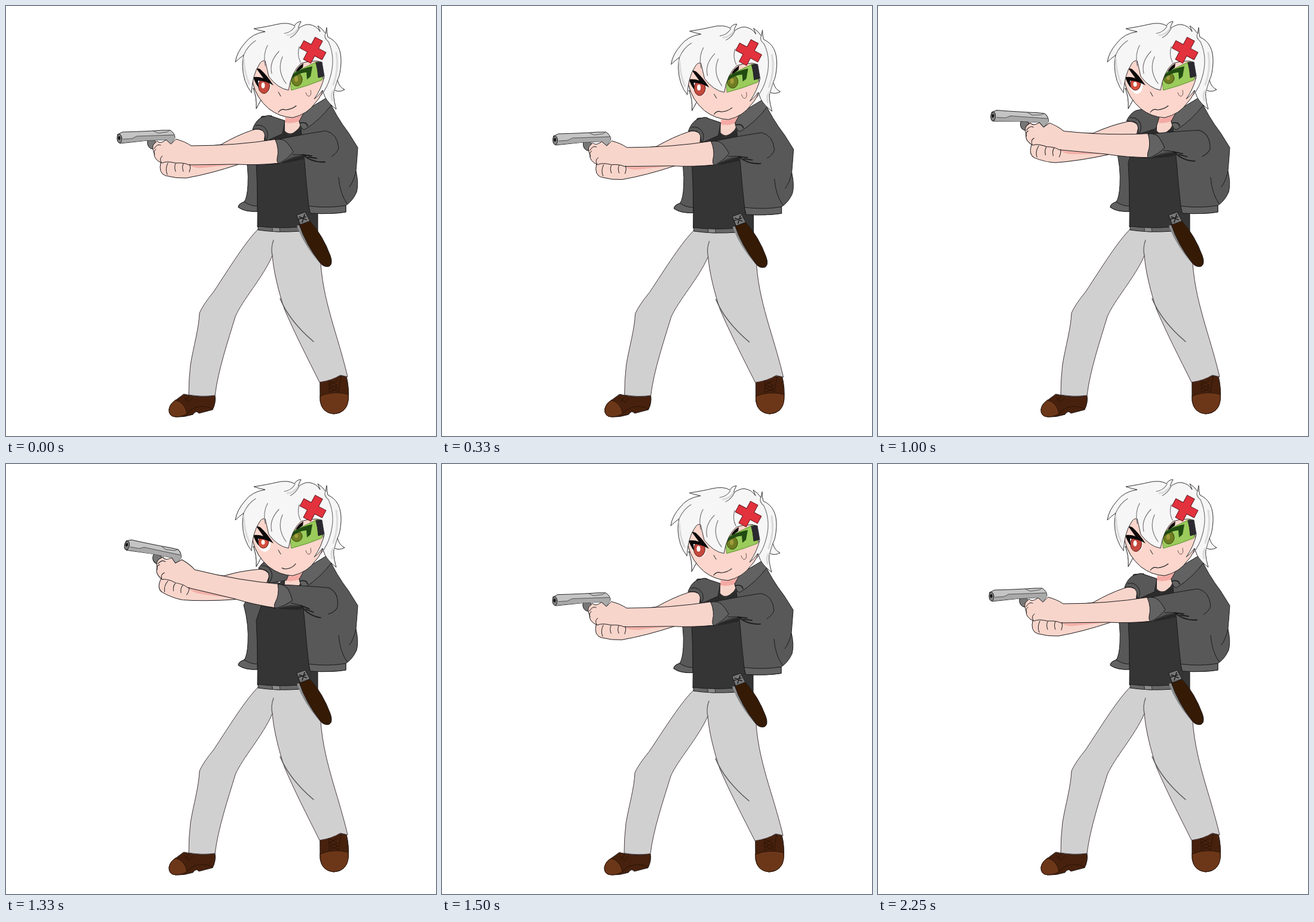
These frames come from a looping animation (720x720 px, 2410 ms). An HTML page with a canvas:

```html
<!DOCTYPE html>
<html lang="en">
<head>
<meta charset="utf-8">
<title>Aiming</title>
<style>
html, body { margin: 0; width: 100%; height: 100%; overflow: hidden; background: #fff; }
canvas { display: block; width: 720px; height: 720px; }
</style>
</head>
<body>
<canvas id="stage" width="720" height="720"></canvas>
<script>
const ctx = document.getElementById('stage').getContext('2d');
const LOOP = 2410, STEP = 1000 / 12;
const INK = '#1d1b1d', SKIN = '#f8d5cb', CLOTH = '#585858', TRIM = '#626262', SHIRT = '#353535', HAIR = '#f6f6f6';

// Arm lift in degrees and crouch amount, keyed by drawing step
const LIFT = { 9: 0.6, 10: 1.6, 11: 3.2, 12: 6, 13: 12, 14: 18, 15: 20.4, 16: 14, 17: 6 };
const DIP = [1, 0.7, 0.4, 0.15];

function shape(d, fill, line = INK, w = 1) {
  const p = new Path2D(d);
  if (fill) { ctx.fillStyle = fill; ctx.fill(p); }
  if (line) { ctx.strokeStyle = line; ctx.lineWidth = w; ctx.stroke(p); }
}
const stroke = (d, color = INK, w = 1) => shape(d, null, color, w);

function oval(x, y, rx, ry, fill, line, rot = 0) {
  ctx.beginPath();
  ctx.ellipse(x, y, rx, ry, rot, 0, 7);
  ctx.fillStyle = fill;
  ctx.fill();
  if (line) { ctx.strokeStyle = line; ctx.lineWidth = 1; ctx.stroke(); }
}

function turned(x, y, deg, draw) {
  ctx.save();
  ctx.translate(x, y);
  ctx.rotate(deg * Math.PI / 180);
  ctx.translate(-x, -y);
  draw();
  ctx.restore();
}

function legs() {
  shape('M298 650Q326 657 350 652Q352 664 346 676L323 682Q318 676 313 684Q298 689 284 688Q272 687 273 675Q275 665 284 660Z', '#47210d');
  shape('M284 660Q299 663 303 682Q296 688 284 688Q272 687 273 675Q275 665 284 660Z', '#6c3719', '#2a1408');
  stroke('M303 682Q320 664 345 674M298 655L306 663M307 653L300 662M313 656L306 664', '#2a1408');
  shape('M526 628Q545 617 570 620Q575 640 573 660Q570 682 549 683Q529 681 526 662Z', '#47210d');
  shape('M526 653Q548 644 573 650Q576 680 549 683Q525 681 526 653Z', '#6c3719', '#2a1408');
  stroke('M541 627L555 635L542 640L556 645M555 627L541 634L556 640L543 646M541 622V647M561 620L557 646', '#2a1408');
  shape('M423 373C402 393 375 437 348 478Q330 500 324 514C323 540 314 570 309 600Q306 625 306 651Q328 655 350 652C355 610 372 560 384 520C396 492 430 455 446 418C448 445 457 480 466 507C482 545 505 590 525 630Q546 627 560 618L572 621C566 595 557 565 548 535C538 500 530 470 527 432L508 374Z', '#d0d0d0', '#493b3f');
  stroke('M448 392Q443 405 446 418', '#555', 1.2);
  stroke('M459 490Q474 527 515 562', '#555', 1.4);
}

function torso() {
  shape('M428 185Q410 215 398 236Q407 270 405 300Q404 320 399 328Q389 331 389 337Q400 345 421 344L421 262L468 215L445 184Z', CLOTH);
  shape('M399 328Q409 335 421 335V344Q400 345 389 337Q389 331 399 328Z', TRIM);
  shape('M467 193L435 215L419 262Q422 320 421 370Q455 374 491 371L522 380V343L508 345L502 190Z', SHIRT);
  shape('M423 369Q455 373 492 370L494 377Q455 380 422 375Z', '#676767');
  shape('M446 371L458 371.5L459 378L447 377.5Z', '#8c8c8c', '#333');
  shape('M467 184L467 209Q476 219 489 206L498 190V170Z', SKIN, null);
  shape('M468 187Q480 190 496 182L491 193Q479 198 467 195Z', '#f4aaa4', null);
  shape('M456 206L467 210L475 218L491 204L497 214L477 238L446 230Z', '#2c2c2c', null);
  shape('M540 156Q552 184 574 213L589 237Q588 253 586 276Q591 298 587 312Q580 327 569 334L569 345Q545 349 510 347L507 335Q503 300 500 262L494 207L510 180Z', CLOTH);
  shape('M507 335Q540 339 569 334V345Q545 349 510 347Z', TRIM);
  stroke('M557 287Q559 314 571 331M586 277Q582 294 575 303');
  shape('M491 193L500 176Q518 165 538 153L547 163Q525 192 500 207Q494 208 491 193Z', TRIM);
  stroke('M492 196Q503 193 505 201', INK, 1.6);
  shape('M487 368L510 361Q531 387 543 418Q548 432 541 436Q532 438 525 430Q499 401 487 368Z', '#8b8b8b', null);
  shape('M491 366L509 360Q531 385 543 418Q548 432 541 436Q532 438 526 430Q502 399 491 366Z', '#351a05');
  shape('M487 350L501 345L509 360L493 366Z', '#777');
  stroke('M491 353L503 358M500 349L496 362M490 357L502 353', INK, 1.6);
}

function gun() {
  shape('M237 225Q235 238 247 240L254 230L249 225Z', '#777');
  shape('M187 215L195 211Q235 210 262 208L275 208Q283 213 283 221L276 231L266 224L238 225L191 230Q185 222 187 215Z', '#c4c4c4', '#2b2526');
  shape('M196 223L211 222L219 218L280 215L283 221L276 231L266 224L238 225L193 229Z', '#a9a9a9', null);
  stroke('M196 223L211 222L219 218L281 216M246 209L255 213L270 211L274 208', '#555');
  oval(190, 222, 4, 7.5, '#808080', INK, -0.05);
  oval(189.5, 221, 2, 3, '#111');
}

function farArm() {
  shape('M259 262Q255 280 267 284Q285 289 302 288Q342 281 390 265L430 245L434 212Q424 203 412 208Q388 216 360 232L300 240Z', SKIN);
  shape('M308 267L382 265L330 271Q314 272 308 267Z', '#f3b0a8', null);
  shape('M413 206Q418 192 427 187L440 183L467 192L463 214L438 225Q434 226 434 220Q433 205 421 206Z', CLOTH);
  stroke('M418 200Q431 197 437 209Q440 218 436 225');
}

function nearArm() {
  // Shade the sleeve casts on the shirt
  shape('M420 262L459 262L499 250L499 256Q470 264 440 266Z', '#272727', null);
  gun();
  shape('M285 223Q300 227 310 234Q385 234 453 223L459 263Q420 267 385 265L306 266Q298 262 284 263Q269 259 261 263Q247 257 248 246Q244 237 247 232L253 226Q258 232 268 224L276 231Z', SKIN);
  stroke('M248 239Q253 230 259 233M249 249Q246 243 251 240M260 262Q256 255 262 251');
  stroke('M271 263Q266 273 270 282M284 264Q281 269 284 277M297 264Q294 270 297 277M308 265Q310 271 307 278');
  // Sleeve with rolled cuff
  shape('M453 224Q490 216 535 209Q558 215 557 240Q551 253 534 258Q514 258 497 250Q481 249 459 264Z', CLOTH, null);
  stroke('M453 224Q490 216 535 209Q555 213 557 238Q554 247 545 252M480 249Q497 248 503 251');
  stroke('M497 249Q513 263 534 261M496 249L512 251M506 253L520 255', INK, 1.8);
  shape('M451 224Q462 221 470 228Q477 236 481 244Q471 257 456 264Q453 261 454 255Q458 240 451 224Z', TRIM);
}

function face(look, smile, twitch) {
  shape('M414 138Q420 152 419 172Q427 158 430 150Z', HAIR);
  shape('M415 95L413 128Q419 154 440 172Q458 186 480 187Q505 181 518 162Q530 150 533 130L525 90L470 70Z', '#fcd6cc');

  // Bare eye
  shape('M416 123Q430 120 443 131Q444 145 434 147Q422 146 416 123Z', '#fff', null);
  oval(432 - look, 134 - 3 * look + twitch, 9.5 - look, 12.5 - 2.5 * look, look > 0.5 ? '#d5503e' : '#c4483d', '#5b1b17');
  oval(430.5, 133 - 2 * look + twitch, 3, 5 - look, '#fff');
  shape('M418 103L426 106Q438 117 448 133Q434 125 422 125L423 137Q417 129 414 119Q424 118 431 121Z', '#0c0a0b', null);

  // Eye behind the lens
  shape('M475 115L521 93L533 97L529 124Q505 134 478 141Z', '#9acb5b', '#5f8f35');
  oval(487, 123 - 2 * look + twitch, 9, 11 - 2 * look, '#6f7d22', '#39480d');
  oval(486, 122 - 2 * look + twitch, 3.2, 5 - look, '#a19b3c');
  shape('M476 118Q488 106 513 101L510 118L504 123L503 111Q490 112 478 122Z', '#214b12', null);
  shape('M485 110Q489 101 498 96L497 103L489 109Z', '#0c0a0b', null);
  shape('M519 95L530 93L533 117L523 120Q522 106 519 95Z', '#2b2930');

  stroke('M456 144L460 151');
  stroke(smile ? 'M462 174Q467 177 473 175Q481 173 485 167' : 'M456 178Q461 171 468 174Q479 173 486 167', INK, 1.1);
  stroke('M502 145Q504 152 508 151Q512 149 510 141', '#6d5753');
}

function hair() {
  shape('M411 145Q397 128 396 100Q396 88 398 82Q390 88 384 94Q386 78 400 62Q412 46 434 43Q424 41 415 38Q440 34 452 31Q472 26 483 33Q487 26 494 26Q490 33 489 38Q500 30 508 31Q520 33 526 43L522 33Q530 38 535 46L537 36Q537 46 539 52Q562 62 561 95Q560 115 555 124Q558 136 567 140Q558 145 550 141Q546 148 553 173Q540 163 534 152L530 141Q524 150 516 156Q529 137 533 118L529 94L520 92Q505 92 494 96Q478 110 473 141Q455 138 440 118L434 92Q428 90 424 98Q413 114 411 145Z', HAIR, '#353235');
  stroke('M553 78Q558 105 548 132M398 88Q399 112 407 130M489 38Q482 48 471 49M549 141Q543 146 546 158', '#dadada', 3);
  stroke('M438 66Q430 80 434 100M463 85Q453 108 469 130M457 76Q440 94 445 113M484 34Q478 44 466 46M491 37Q486 48 476 53M398 82Q405 66 418 58M535 46Q531 52 540 60Q553 88 542 122Q538 136 528 149M555 124Q551 136 550 141M491 68Q487 82 493 94', '#77747a', 1.2);
  turned(514, 74, 28, () => shape('M507 53H521V67H535V81H521V95H507V81H493V67H507Z', '#e2323d', '#64151b'));
}

function draw(k) {
  const lift = LIFT[k] || 0;
  const dip = DIP[k - 2] || DIP[k - 18] || 0;
  const look = Math.min(1, lift / 6);
  const twitch = k > 22 && k < 27 ? -Math.sin((k - 22) * Math.PI / 5) : 0;
  ctx.fillStyle = '#fff';
  ctx.fillRect(0, 0, 720, 720);
  ctx.save();
  // Crouch squashes the figure towards the soles
  ctx.translate(-dip, 688);
  ctx.scale(1, 1 - 0.016 * dip);
  ctx.translate(0, -688);
  legs();
  torso();
  turned(545, 230, lift, farArm);
  face(look, lift > 10, twitch);
  hair();
  turned(545, 230, lift, nearArm);
  ctx.restore();
}

ctx.lineJoin = ctx.lineCap = 'round';
let last = -1;
function tick() {
  const k = Math.floor((performance.now() % LOOP + 4) / STEP);
  if (k !== last) draw(last = k);
  requestAnimationFrame(tick);
}
tick();
</script>
</body>
</html>
```
